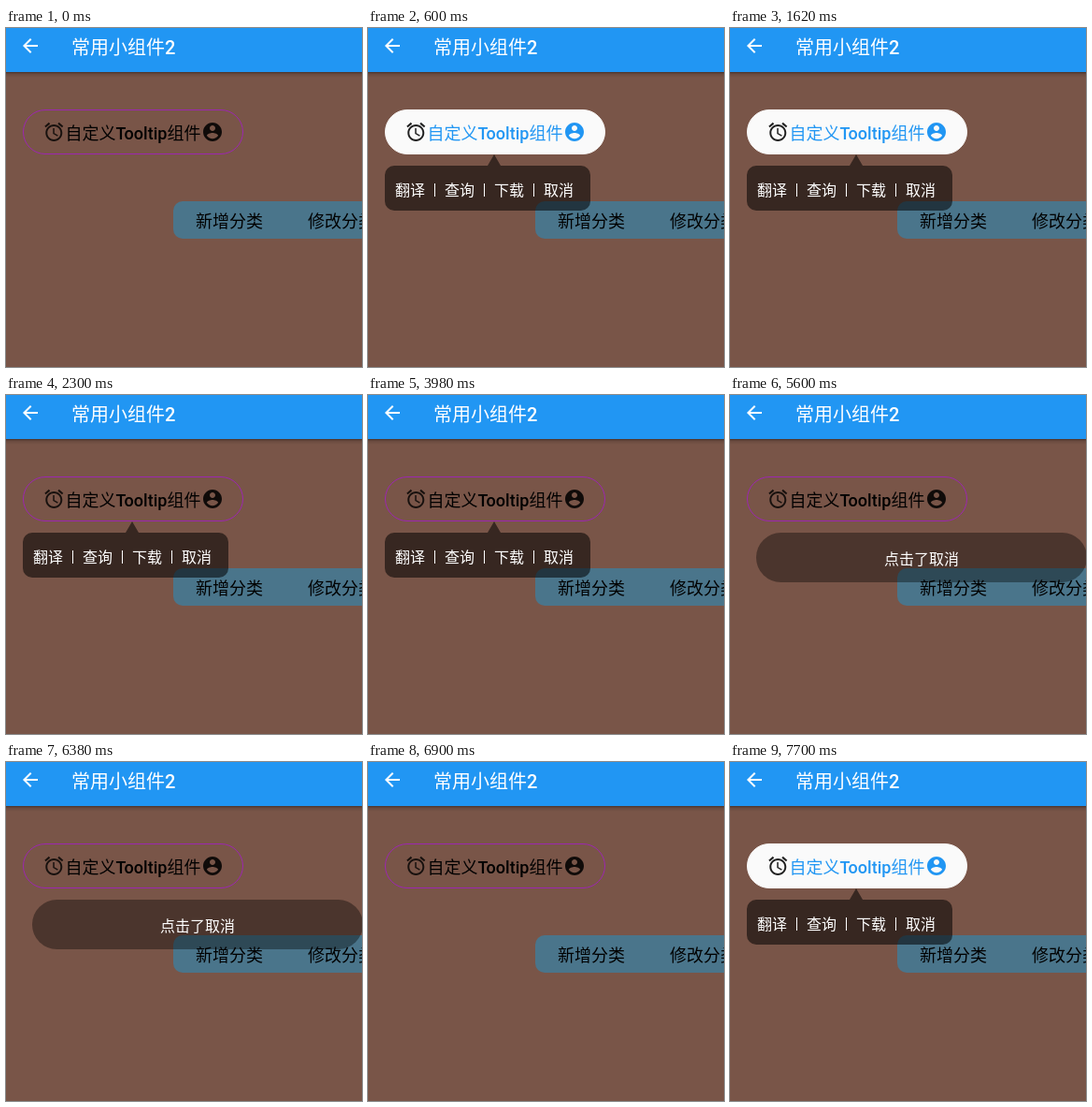
Animation, 381 px wide and 362 px high, one loop 8 s. Source, as an HTML page:

```html
<!DOCTYPE html>
<html lang="zh-CN">
<head>
<meta charset="utf-8">
<style>
  html, body { margin: 0; width: 100%; height: 100%; overflow: hidden; background: #795548; }
  svg { display: block; width: 381px; height: 362px; }
  text { font: 500 18px Roboto, "Noto Sans CJK SC", "Noto Sans CJK", sans-serif; }
  .title { font-size: 20px; fill: #fff; }
  .small { font-size: 16px; font-weight: 400; fill: #fff; }
  #button rect { fill: none; stroke: #9c27b0; }
  #button .alarm { fill-opacity: .8; }
  #button .user { fill-opacity: .87; }
  #button.active rect { fill: #fafafa; stroke: #fafafa; }
  #button.active .alarm { fill-opacity: .87; }
  #button.active .user, #button.active text { fill: #2196f3; fill-opacity: 1; }
</style>
</head>
<body>
<svg viewBox="0 0 381 362">
  <defs>
    <linearGradient id="shade" x2="0" y2="1">
      <stop stop-opacity=".38"/>
      <stop offset=".4" stop-opacity=".12"/>
      <stop offset="1" stop-opacity="0"/>
    </linearGradient>
  </defs>
  <rect width="381" height="362" fill="#795548"/>

  <rect y="47" width="381" height="6" fill="url(#shade)"/>
  <rect width="381" height="47" fill="#2196f3"/>
  <path transform="translate(14 7)" fill="#fff" d="M20 11H7.83l5.59-5.59L12 4l-8 8 8 8 1.41-1.41L7.83 13H20z"/>
  <text class="title" x="70" y="28">常用小组件2</text>

  <g id="button">
    <rect x="18.5" y="87.5" width="235" height="47" rx="23.5"/>
    <path class="alarm" transform="translate(39.3 99)" d="M22 5.72l-4.6-3.86-1.29 1.53 4.6 3.86L22 5.72zM7.88 3.39L6.6 1.86 2 5.71l1.29 1.53 4.59-3.85zM12.5 8H11v6l4.75 2.85.75-1.23-4-2.37V8zM12 4c-4.97 0-9 4.03-9 9s4.02 9 9 9c4.97 0 9-4.03 9-9s-4.03-9-9-9zm0 16c-3.87 0-7-3.13-7-7s3.13-7 7-7 7 3.13 7 7-3.13 7-7 7z"/>
    <text x="63.5" y="118.7">自定义Tooltip组件</text>
    <path class="user" transform="translate(209 99)" d="M12 2C6.48 2 2 6.48 2 12s4.48 10 10 10 10-4.48 10-10S17.52 2 12 2zm0 3c1.66 0 3 1.34 3 3s-1.34 3-3 3-3-1.34-3-3 1.34-3 3-3zm0 14.2c-2.5 0-4.71-1.28-6-3.22.03-1.99 4-3.08 6-3.08 1.99 0 5.97 1.09 6 3.08-1.29 1.94-3.5 3.22-6 3.22z"/>
  </g>

  <rect x="179" y="185" width="240" height="40" rx="10" fill="#4a758b"/>
  <text x="203" y="212.7">新增分类</text>
  <text x="323" y="212.7">修改分类</text>

  <g id="menu">
    <path fill-opacity=".54" d="M28 147H128L135 135L142 147H228a10 10 0 0 1 10 10V185a10 10 0 0 1-10 10H28a10 10 0 0 1-10-10V157a10 10 0 0 1 10-10z"/>
    <path stroke="#fff" d="M71.5 166v14m53-14v14m53-14v14"/>
    <g class="items">
      <text class="small" x="29" y="179">翻译</text>
      <text class="small" x="82" y="179">查询</text>
      <text class="small" x="135" y="179">下载</text>
      <text class="small" x="188" y="179">取消</text>
    </g>
  </g>

  <g id="toast">
    <rect x="28" y="147" width="354" height="53" rx="26.5" fill-opacity=".38"/>
    <text class="small" x="205" y="181" text-anchor="middle">点击了取消</text>
  </g>
</svg>
<script>
  const LOOP = 8000;
  // [start, end) spans in ms
  const spans = {
    active: [[600, 2300], [7700, 8000]],
    menu: [[600, 5600], [7700, 8000]],
    toast: [[5100, 6900]]
  };
  const [button, menu, toast] = ['button', 'menu', 'toast'].map(id => document.getElementById(id));
  const on = (name, t) => spans[name].some(([a, b]) => t >= a && t < b);
  const show = (el, visible) => { el.style.display = visible ? '' : 'none'; };

  let start;
  function draw(now) {
    start ??= now;
    const t = (now - start) % LOOP;
    button.classList.toggle('active', on('active', t));
    show(menu, on('menu', t));
    show(toast, on('toast', t));
    requestAnimationFrame(draw);
  }
  draw(performance.now());
</script>
</body>
</html>
```
